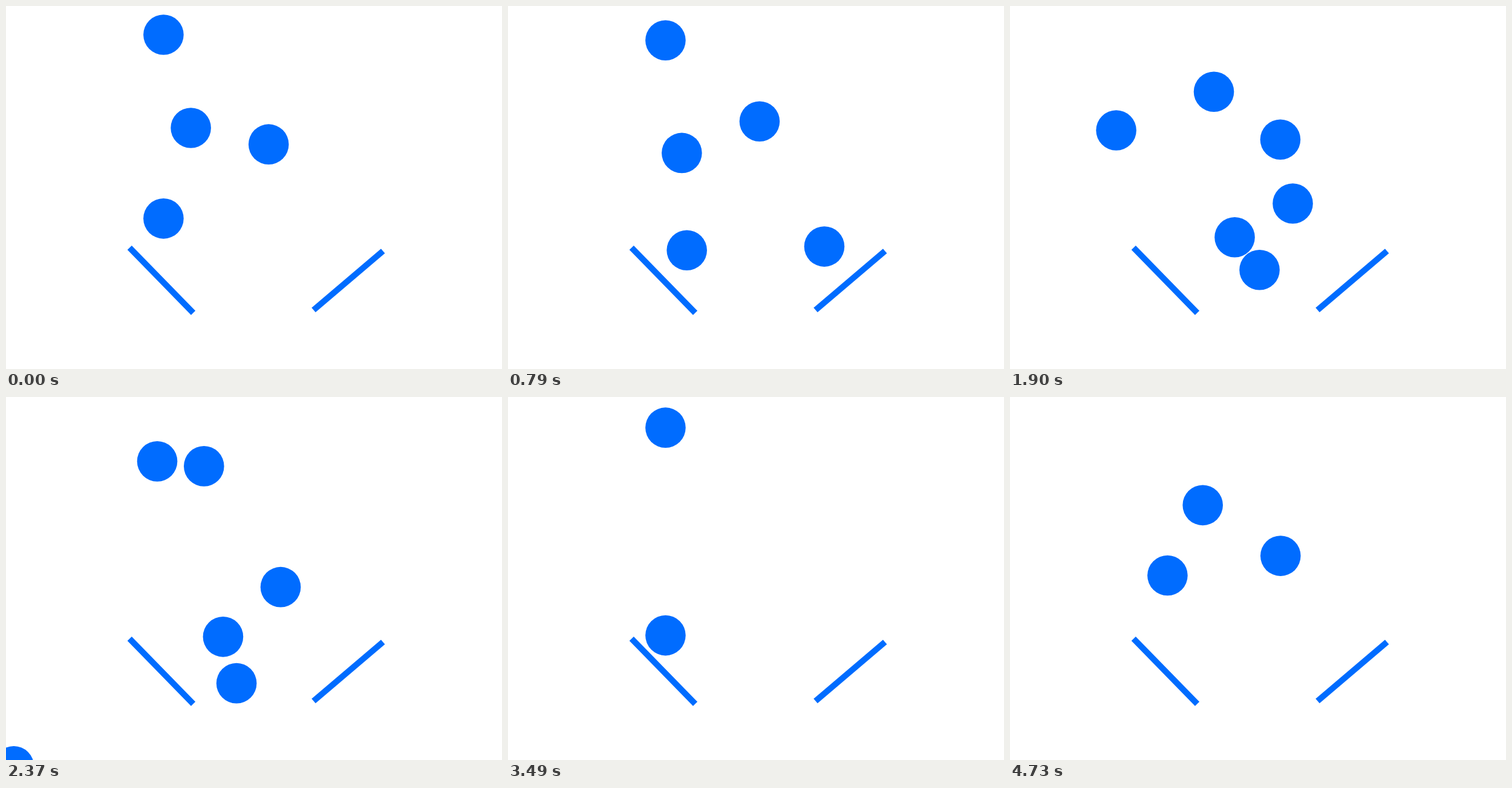
An HTML page with a canvas for the animation above (4.76 s loop, 820 by 600 pixels).

```html
<!DOCTYPE html>
<html lang="en">
<head>
<meta charset="utf-8">
<title>Bouncing balls</title>
<style>
  html, body { margin: 0; width: 100%; height: 100%; overflow: hidden; background: #fff; }
  canvas { display: block; }
</style>
</head>
<body>
<canvas id="stage" width="820" height="600"></canvas>
<script>
const ctx = document.getElementById('stage').getContext('2d');
const LOOP = 4760, POSES = 152;            // the picture changes in even steps
const START = 1.95, SPEED = 1.969;         // simulation ticks: first pose, per pose
const SPAWN = 43.1, FIRST = -3, BALLS = 10;
const HALF_G = 0.15, RADIUS = 33.3;

// Every ball drops, then bounces from bar to bar through these points: age, x, y.
const route = [[0, 260.4, 46.9], [48.6, 260.4, 401.2], [66.1, 500, 458], [151.9, 244, 386],
  [177.4, 532, 432], [211.7, 431, 209], [233.8, 325.5, 113]];

// Hits between balls, in spawn order: age, then the velocity after the hit.
const hits = [[233.8, 0.74, -0.49], [233.8, 0.88, 0.38], [163.6, 0.17, -1.27],
  [82.4, -1.03, -1.36], [82.4, 0.11, -1.97], [18.5, -5.51, 4.66], [18.5, -5.69, 4.18]];

// Parabola between the two route points around the given age.
function onRoute(age) {
  const next = Math.max(1, route.findIndex(point => point[0] >= age));
  const [t0, x0, y0] = route[next - 1], [t1, x1, y1] = route[next];
  const f = (age - t0) / (t1 - t0);
  return [x0 + (x1 - x0) * f, y0 + (y1 - y0) * f - HALF_G * (age - t0) * (t1 - age)];
}

function position(ball, age) {
  const [hitAge, vx, vy] = hits[ball] || [Infinity];
  if (age <= hitAge) return onRoute(age);
  const [x, y] = onRoute(hitAge), t = age - hitAge;
  return [x + vx * t, y + vy * t + HALF_G * t * t];
}

function drawBall(x, y) {
  ctx.beginPath();
  ctx.arc(x, y, RADIUS, 0, Math.PI * 2);
  ctx.fill();
}

function drawBar(x0, y0, x1, y1) {
  ctx.beginPath();
  ctx.moveTo(x0, y0);
  ctx.lineTo(x1, y1);
  ctx.stroke();
}

function render() {
  const pose = Math.floor(performance.now() % LOOP / LOOP * POSES);
  const tick = START + SPEED * pose;
  ctx.clearRect(0, 0, 820, 600);
  ctx.fillStyle = ctx.strokeStyle = '#006cff';
  ctx.lineWidth = 10;
  drawBar(204.3, 399.5, 309.5, 507.3);
  drawBar(508.5, 502.5, 623.2, 405);
  for (let ball = 0; ball < BALLS; ball++) {
    const age = tick - (ball + FIRST) * SPAWN;
    if (age >= 0) drawBall(...position(ball, age));
  }
  requestAnimationFrame(render);
}
render();
</script>
</body>
</html>
```
